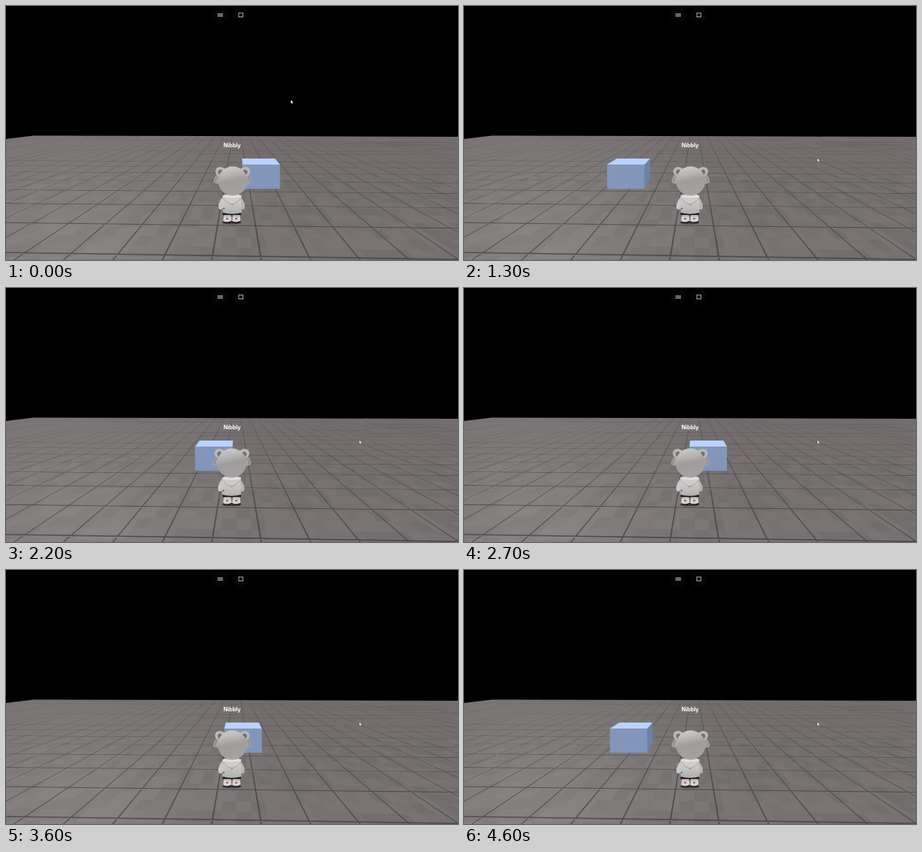
These frames come from a looping animation (600 px wide and 338 px high, 4.7 s). An HTML page:

```html
<!DOCTYPE html>
<html lang="en">
<head>
<meta charset="utf-8">
<title>Sliding block</title>
<style>
html, body { margin: 0; width: 100%; height: 100%; overflow: hidden; background: #000; }
svg { display: block; width: 100vw; height: 100vh; }
text { font: 700 7.2px Inter, "Open Sans", sans-serif; fill: #fff; text-anchor: middle; }
</style>
</head>
<body>
<svg viewBox="0 0 600 338">
  <defs>
    <linearGradient id="ground" gradientUnits="userSpaceOnUse" x1="0" y1="172" x2="0" y2="338">
      <stop offset="0" stop-color="#736e6d"/>
      <stop offset="1" stop-color="#777171"/>
    </linearGradient>
    <radialGradient id="glow" gradientUnits="userSpaceOnUse" cx="90" cy="320" r="270">
      <stop offset="0" stop-color="#fff" stop-opacity=".13"/>
      <stop offset="1" stop-color="#fff" stop-opacity="0"/>
    </radialGradient>
    <linearGradient id="hair" x1=".35" y1="0" x2=".55" y2="1">
      <stop offset="0" stop-color="#cecccb"/>
      <stop offset=".3" stop-color="#b4b2b1"/>
      <stop offset=".5" stop-color="#9f9d9c"/>
      <stop offset="1" stop-color="#a5a3a2"/>
    </linearGradient>
    <linearGradient id="cloth" x1="0" y1="0" x2="0" y2="1">
      <stop offset="0" stop-color="#dcdad9"/>
      <stop offset="1" stop-color="#b0aeae"/>
    </linearGradient>
  </defs>

  <rect width="600" height="338"/>
  <path id="plate" fill="url(#ground)"/>
  <path id="darkCells" fill="#000" opacity=".03"/>
  <path id="lightCells" fill="#fff" opacity=".02"/>
  <path id="light" fill="url(#glow)"/>
  <path id="joints" fill="#3f3b3b" opacity=".7"/>

  <path id="boxSide" fill="#6c82a8"/>
  <path id="boxTop" fill="#b9d3fe"/>
  <path id="boxFront" fill="#8196ba"/>

  <ellipse cx="299.500" cy="288.500" rx="13" ry="1.700" fill="#292727" opacity=".6"/>
  <g id="legs">
    <path d="M287.500 273h24.500v5q-6 2.300-11.500 .5q-7 2-13-.5z" fill="#1b1a1a"/>
    <g id="shoe">
      <path d="M288.200 285.500h11.300v2.500q-5.500 2.600-11.300 0z" fill="#1f1e1e"/>
      <path d="M289.300 278.300h9.200l1 7.500q-5.500 3.100-11.300 .4z" fill="#d5d3d2"/>
      <path d="M289.500 279.700q4.500 1.500 9 0" fill="none" stroke="#a09c9a" stroke-width=".7"/>
      <path d="M293.600 284.500l-1.500-1.500q-.2-1.200.9-1.100l.6.500.6-.5q1.100-.1.900 1.100z" fill="#c02c4c"/>
    </g>
    <use href="#shoe" x="12"/>
  </g>
  <g id="torso">
    <path d="M289 253q-5 4-6.700 10.500q-1 5.500 1 7q2.800 1 4.500-1.500l3-12z" fill="#cac8c7"/>
    <path d="M310 253q5 4 6.800 10.500q.8 5.500-1.200 7q-2.800 1-4.600-1.500l-3-12z" fill="#b8b6b5"/>
    <path d="M290 251h20l2.200 10 .6 14q-12.500 3.500-25.300 0l.5-14z" fill="url(#cloth)"/>
    <path d="M287 254q12.500-8 26 0q-2.800 7.500-13 10q-10-3-13-10z" fill="#cfcdcc"/>
    <path d="M287.500 252.500q12 3.500 25 0" fill="none" stroke="#eceaea" stroke-width="1.500"/>
    <path d="M288 256q5.500 6.500 12 8q7-2 12-8" fill="none" stroke="#989593" stroke-width=".8"/>
    <path d="M298.500 263.300l1.700 1.700 2-1.800" fill="none" stroke="#b5a048" stroke-width="1.200"/>
    <path d="M288.500 269.500h1.500" stroke="#343333" stroke-width="1.300"/>
  </g>
  <g id="head">
    <g id="tuft">
      <path d="M282 222q-6.500 4-7.200 12.500q2.500 2.500 7.500 2l4-10z" fill="#a5a3a1"/>
      <path d="M277 220q1-5.800 6.500-6q5 .4 7 4l-6 9q-6.800-1.500-7.500-7z" fill="#bbb9b7"/>
      <path d="M280.500 221q1-3.800 4.500-3.500l2 2.500-4.500 5z" fill="#75716f"/>
      <path d="M279.800 226.500q-2.800 4-2.500 8.300" fill="none" stroke="#7b7775" stroke-width=".9"/>
    </g>
    <use href="#tuft" transform="translate(600.500 0) scale(-1 1)"/>
    <ellipse cx="300.200" cy="232.900" rx="19.500" ry="19.300" fill="url(#hair)"/>
  </g>
  <text x="300.200" y="188">Nibbly</text>

  <circle cx="284.300" cy="12" r="11" fill="#050505"/>
  <circle cx="311.700" cy="12" r="11" fill="#050505"/>
  <path d="M280.700 10.400h7.400M280.700 12h7.400M280.700 13.600h7.400" stroke="#d0d0d0" stroke-width=".8"/>
  <rect x="309" y="9.200" width="5.400" height="5.400" fill="none" stroke="#d0d0d0" stroke-width=".8"/>
  <path id="cursor" d="M0 0v4.800l1.200-1 .8 1.700 .9-.4-.8-1.700h1.500z" fill="#fff" stroke="#222" stroke-width=".3"/>
</svg>

<script>
const LOOP = 4700, STEP = 100;
const $ = id => document.getElementById(id);
const mix = (a, b, k) => a + (b - a) * k;
const polygon = points => "M" + points.map(p => p.map(n => n.toFixed(2)).join(" ")).join("L") + "Z";

// Floor tiles (u across, v away) seen in perspective.
const HORIZON = 140, VANISH_X = 306, CROSS_X = -12000;
function project(u, v) {
  const a = -0.005335 * u, b = 0.274 * v, w = 1 + a + b;
  return [(VANISH_X * (1 + b) + CROSS_X * a) / w, (338 + HORIZON * (a + b)) / w];
}
const floorRect = (u0, v0, u1, v1) =>
  polygon([project(u0, v0), project(u1, v0), project(u1, v1), project(u0, v1)]);

const LEFT = -25, RIGHT = 28, NEAR = -0.9, FAR = 18.1;

function hash(i, j) {
  const s = Math.sin(i * 127.1 + j * 311.7) * 43758.5453;
  return s - Math.floor(s);
}

function buildFloor() {
  const half = 0.016;
  let joints = "", dark = "", light = "";
  for (let u = LEFT + 0.5; u < RIGHT; u++) joints += floorRect(u - half, NEAR, u + half, FAR);
  for (let v = NEAR; v < FAR; v++) joints += floorRect(LEFT, v - half, RIGHT, v + half);
  for (let i = -48; i < 48; i++) {
    for (let j = -2; j < 15; j++) {
      const shade = hash(i, j), cell = floorRect(i / 3, j / 3, (i + 1) / 3, (j + 1) / 3);
      if (shade < 0.3) dark += cell;
      else if (shade > 0.7) light += cell;
    }
  }
  const plate = floorRect(LEFT, NEAR, RIGHT, FAR);
  $("plate").setAttribute("d", plate);
  $("light").setAttribute("d", plate);
  $("joints").setAttribute("d", joints);
  $("darkCells").setAttribute("d", dark);
  $("lightCells").setAttribute("d", light);
}

// The block slides at a steady speed and turns at each end.
const TRACK = [[0, 314], [1435, 177], [3100, 338], [LOOP, 184]];
function blockX(t) {
  const i = TRACK.findIndex(([time]) => time > t);
  const [t0, x0] = TRACK[i - 1], [t1, x1] = TRACK[i];
  return mix(x0, x1, (t - t0) / (t1 - t0));
}

function drawBlock(left) {
  const right = left + 49.7, top = 211, bottom = 243.3;
  const back = (x, y) => [mix(VANISH_X, x, 0.889), mix(HORIZON, y, 0.889)];
  const side = left > VANISH_X ? left : right;
  $("boxFront").setAttribute("d", polygon([[left, top], [right, top], [right, bottom], [left, bottom]]));
  $("boxTop").setAttribute("d", polygon([[left, top], [right, top], back(right, top), back(left, top)]));
  $("boxSide").setAttribute("d", polygon([[side, top], back(side, top), back(side, bottom), [side, bottom]]));
}

const shift = (id, x, y = 0) => $(id).setAttribute("transform", `translate(${x.toFixed(2)} ${y.toFixed(2)})`);

function render(t) {
  drawBlock(blockX(t));
  const sway = -Math.cos((t - 700) / 1650 * 2 * Math.PI);
  shift("head", 0.2 + 0.7 * sway);
  shift("torso", 0.4 * sway - 0.3);
  const k = Math.min(t / 500, 1), ease = k * k * (3 - 2 * k);
  shift("cursor", mix(378, 469, ease), mix(125, 202.5, ease));
}

function tick() {
  const t = performance.now() % LOOP;
  render(Math.floor(t / STEP) * STEP);
  requestAnimationFrame(tick);
}

buildFloor();
tick();
</script>
</body>
</html>
```
